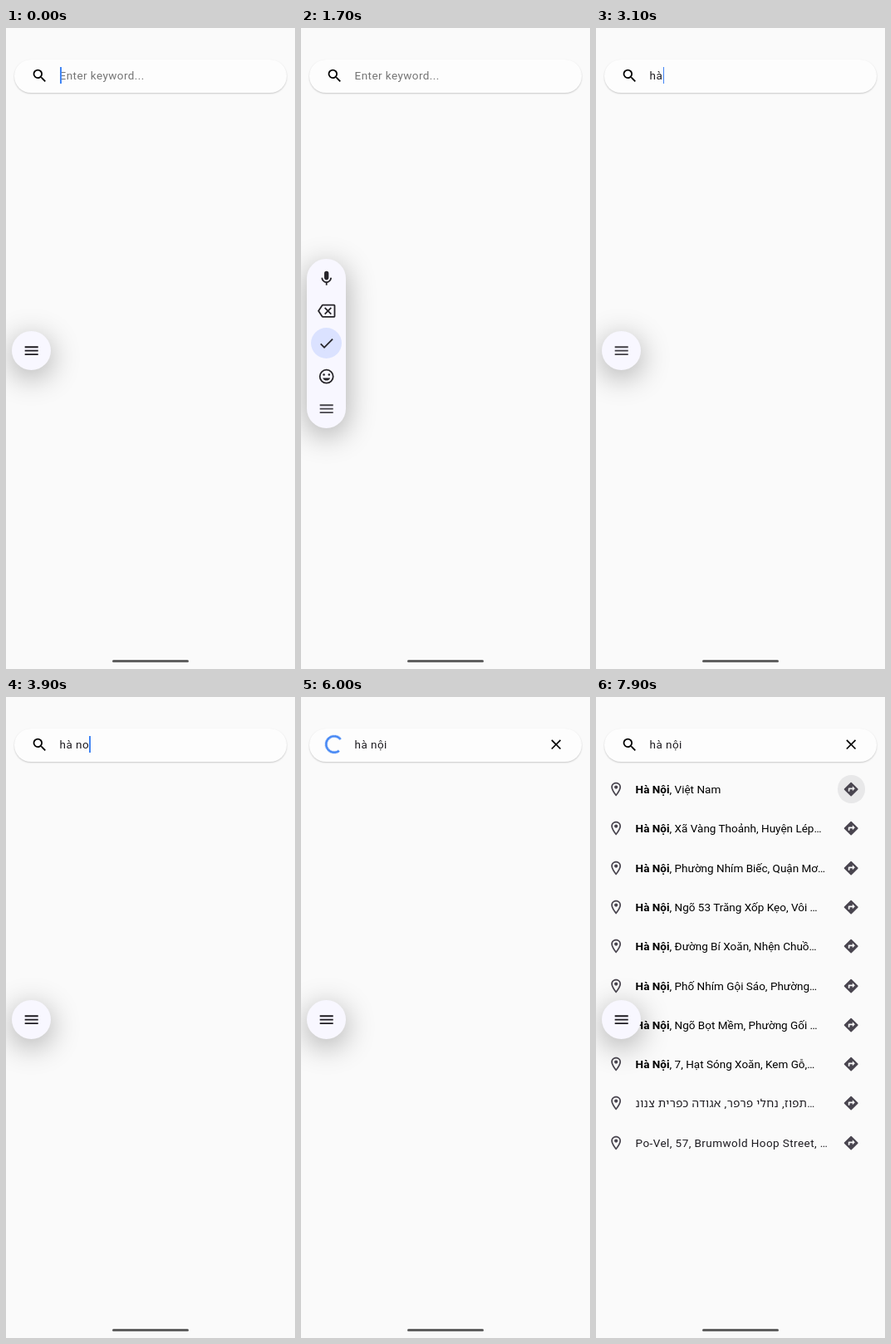
An HTML page for the animation above (8000 ms loop, 348x772 px).

```html
<!DOCTYPE html>
<html lang="vi">
<head>
<meta charset="utf-8">
<title>Place search</title>
<style>
html, body { margin: 0; width: 100%; height: 100%; overflow: hidden; }
body {
  position: relative; background: #fafafa; color: #1d1b20;
  font: 13.52px/20px Roboto, "Noto Sans Hebrew", "Noto Sans", "DejaVu Sans", sans-serif;
}
/* every animation shares one 8 s clock: 1% = 80 ms */
.anim, .typed, .typed::after {
  animation: 8s step-end -20ms infinite;
}
div, svg, span.typed { position: absolute; }
svg { display: block; fill: currentColor; overflow: visible; }

.bar {
  left: 10px; top: 37.5px; width: 328px; height: 40.3px; border-radius: 20px; color: #1d1b20;
  background: #fdfdfd; box-shadow: 0 1px 2px rgba(0, 0, 0, .2);
}
.bar path { fill: #000; }
.hint, .typed { left: 54.6px; top: 9.5px; white-space: pre; letter-spacing: .42px; }
.hint { color: #757575; animation-name: hint; }
.typed { visibility: hidden; }
.typed::after {
  content: ""; position: absolute; left: calc(100% + .4px); top: 0;
  width: 1.7px; height: 20.3px; background: #4285f4; animation-name: blink;
}
.glass { animation-name: glass; }
.loaded { visibility: hidden; animation-name: loaded; }
.clear { visibility: hidden; animation-name: clear; }
.spin { visibility: hidden; animation-name: spin; transform-origin: 50% 50%; }
.spin circle { fill: none; stroke: #4285f4; stroke-width: 2.6; animation-name: sweep; stroke-dasharray: 0 100; }

.row { left: 0; width: 348px; height: 47.3px; }
.row p {
  position: absolute; left: 47.6px; top: 13.6px; margin: 0;
  white-space: pre; color: #000;
}
.row p.plain { letter-spacing: .42px; color: #1d1b20; }
.row svg { color: #49454f; }
.press {
  left: 290.6px; top: 6.8px; width: 33.8px; height: 33.8px; border-radius: 50%;
  background: #e8e8e9; visibility: hidden; animation-name: press;
}

.menu {
  left: 7px; top: 365px; width: 47.4px; height: 47.3px; border-radius: 23.7px;
  background: #f8f7ff; overflow: hidden; box-shadow: 0 8px 34px 2px rgba(0, 0, 0, .29);
  animation-name: menu; animation-timing-function: cubic-bezier(.215, .61, .355, 1);
}
.item {
  left: 0; width: 100%; height: 47.3px;
  top: calc((100% - 47.3px) * var(--i) / 4);
  opacity: 0; animation-name: item; animation-timing-function: ease-out;
}
.item.last { opacity: 1; animation-name: last; }
.disc { left: 5.2px; top: 5.2px; width: 37px; height: 37px; border-radius: 50%; background: #dae2ff; }
.handle { left: 128px; top: 760.5px; width: 92px; height: 3px; border-radius: 2px; background: #5f5f5f; }

@keyframes hint { 0% { visibility: visible } 36.25%, 100% { visibility: hidden } }
@keyframes blink {
  0%, 12.5%, 25%, 35%, 67.5%, 80%, 92.5% { opacity: 1 }
  6.25%, 18.75%, 31.25%, 61.25%, 73.75%, 86.25%, 98.75%, 100% { opacity: 0 }
}
@keyframes glass { 0%, 77.5%, 100% { visibility: visible } 67.5% { visibility: hidden } }
@keyframes clear { 0% { visibility: hidden } 67.5%, 100% { visibility: visible } }
@keyframes loaded { 0% { visibility: hidden } 77.5%, 100% { visibility: visible } }
@keyframes press { 0% { visibility: hidden } 96.25%, 100% { visibility: visible } }
@keyframes spin {
  0% { visibility: hidden; transform: rotate(-90deg) }
  67.5% { visibility: visible; transform: rotate(-90deg); animation-timing-function: linear }
  77.5%, 100% { visibility: hidden; transform: rotate(93.6deg) }
}
@keyframes sweep {
  0% { stroke-dasharray: 0 100; stroke-dashoffset: 0 }
  67.5% { stroke-dasharray: 0 100; stroke-dashoffset: 0; animation-timing-function: cubic-bezier(.4, 0, .2, 1) }
  75.83% { stroke-dasharray: 75 100; stroke-dashoffset: 0; animation-timing-function: ease-in }
  77.5%, 100% { stroke-dasharray: 69 100; stroke-dashoffset: -6 }
}
@keyframes menu {
  0%, 19%, 39.25%, 100% { top: 365px; height: 47.3px }
  23.5%, 35.5% { top: 269px; height: 220.4px }
}
@keyframes item {
  0%, 19%, 38%, 100% { opacity: 0 }
  22%, 35.5% { opacity: 1 }
}
@keyframes last {
  0%, 19%, 24%, 35.5%, 42.5%, 100% { opacity: 1 }
  20%, 36.5% { opacity: .6 }
}
</style>
</head>
<body>
<div class="bar" id="bar">
  <div class="hint anim">Enter keyword...</div>
</div>
<div class="loaded anim" id="list"></div>
<div class="menu anim" id="menu"></div>
<div class="handle"></div>

<script>
const paths = {
  search: "M15.5 14h-.79l-.28-.27A6.47 6.47 0 0 0 16 9.5 6.5 6.5 0 1 0 9.5 16c1.61 0 3.09-.59 4.23-1.57l.27.28v.79l5 4.99L20.49 19zm-6 0C7.01 14 5 11.99 5 9.5S7.01 5 9.5 5 14 7.01 14 9.5 11.99 14 9.5 14z",
  close: "M19 6.41 17.59 5 12 10.59 6.41 5 5 6.41 10.59 12 5 17.59 6.41 19 12 13.41 17.59 19 19 17.59 13.41 12z",
  mic: "M12 14c1.66 0 3-1.34 3-3V5a3 3 0 0 0-6 0v6c0 1.66 1.34 3 3 3zm5-3a5 5 0 0 1-10 0H5c0 3.53 2.61 6.43 6 6.92V21h2v-3.08c3.39-.49 6-3.39 6-6.92z",
  erase: "M22 3H7c-.69 0-1.23.35-1.59.88L0 12l5.41 8.11c.36.53.9.89 1.59.89h15c1.1 0 2-.9 2-2V5c0-1.1-.9-2-2-2zm0 16H7.07L2.4 12l4.66-7H22zm-11.59-2L14 13.41 17.59 17 19 15.59 15.41 12 19 8.41 17.59 7 14 10.59 10.41 7 9 8.41 12.59 12 9 15.59z",
  check: "M9 16.17 4.83 12l-1.42 1.41L9 19 21 7l-1.41-1.41z",
  smile: "M12 2a10 10 0 1 0 0 20 10 10 0 0 0 0-20zm0 18a8 8 0 1 1 0-16 8 8 0 0 1 0 16zm3.5-9a1.5 1.5 0 1 0 0-3 1.5 1.5 0 0 0 0 3zm-7 0a1.5 1.5 0 1 0 0-3 1.5 1.5 0 0 0 0 3zm3.5 6.5c2.33 0 4.31-1.46 5.11-3.5H6.89c.8 2.04 2.78 3.5 5.11 3.5z",
  lines: "M3 18h18v-2H3zm0-5h18v-2H3zm0-7v2h18V6z",
  pin: "M12 2C8.13 2 5 5.13 5 9c0 5.25 7 13 7 13s7-7.75 7-13c0-3.87-3.13-7-7-7zM7 9a5 5 0 0 1 10 0c0 2.88-2.88 7.19-5 9.88C9.92 16.21 7 11.85 7 9zm5-2.5a2.5 2.5 0 1 0 0 5 2.5 2.5 0 0 0 0-5z",
  route: "M21.71 11.29l-9-9a1 1 0 0 0-1.41 0l-9 9a1 1 0 0 0 0 1.41l9 9c.39.39 1.02.39 1.41 0l9-9a1 1 0 0 0 0-1.41zM14 14.5V12h-4v3H8v-4c0-.55.45-1 1-1h5V7.5l3.5 3.5z"
};

const icon = (name, x, y, size = 21, cls = "") =>
  `<svg class="${cls}" viewBox="0 0 24 24" width="${size}" height="${size}" ` +
  `style="left:${x - size / 2}px;top:${y - size / 2}px"><path fill-rule="evenodd" d="${paths[name]}"/></svg>`;

// each entry holds the field's text from its time until the next one
const typing = [
  [0, ""], [2800, "h"], [2900, "ha"], [3000, "hà"], [3400, "hà "], [3700, "hà n"],
  [3900, "hà no"], [4000, "hà nô"], [4200, "hà nôi"], [4400, "hà nội"], [8000]
];
let rules = "", fields = "";
typing.slice(0, -1).forEach(([from, text], i) => {
  const to = typing[i + 1][0];
  const before = from > 0 ? "0% { visibility: hidden }" : "";
  const after = to < 8000 ? `${to / 80}%, 100% { visibility: hidden }` : "100% { visibility: visible }";
  rules += `@keyframes type${i} { ${before} ${from / 80}% { visibility: visible } ${after} }\n`;
  fields += `<span class="typed" style="animation-name:type${i}">${text}</span>`;
});
document.head.appendChild(document.createElement("style")).textContent = rules;

bar.innerHTML += fields +
  icon("search", 30.3, 19.7, 21, "glass anim") +
  icon("close", 297.4, 19.6, 20.3, "clear anim") +
  `<svg class="spin anim" width="24" height="24" style="left:18px;top:7.6px">
    <circle class="anim" cx="12" cy="12" r="9.8" pathLength="100"/></svg>`;

const places = [
  "Việt Nam",
  "Xã Vàng Thoảnh, Huyện Lép…",
  "Phường Nhím Biếc, Quận Mơ…",
  "Ngõ 53 Trăng Xốp Kẹo, Vôi …",
  "Đường Bí Xoăn, Nhện Chuồ…",
  "Phố Nhím Gội Sáo, Phường…",
  "Ngõ Bọt Mềm, Phường Gối …",
  "7, Hạt Sóng Xoăn, Kem Gỗ,…"
].map(place => `<p><b>Hà Nội</b>, ${place}</p>`).concat([
  "תפוז, נחלי פרפר, אגודה כפרית צנונ…",
  "Po-Vel, 57, Brumwold Hoop Street, …"
].map(place => `<p class="plain" dir="ltr">${place}</p>`));

list.innerHTML = places.map((text, i) =>
  `<div class="row" style="top:${87.5 + i * 47.3}px">` +
  (i ? "" : '<div class="press anim"></div>') +
  icon("pin", 24, 23.7, 20.3) + text + icon("route", 307.5, 23.7, 20.3) + "</div>").join("");

menu.innerHTML = ["mic", "erase", "check", "smile", "lines"].map((name, i) =>
  `<div class="item anim ${i === 4 ? "last" : ""}" style="--i:${i}">` +
  (name === "check" ? '<div class="disc"></div>' : "") +
  icon(name, 23.8, 23.7, 21.4) + "</div>").join("");
</script>
</body>
</html>
```
